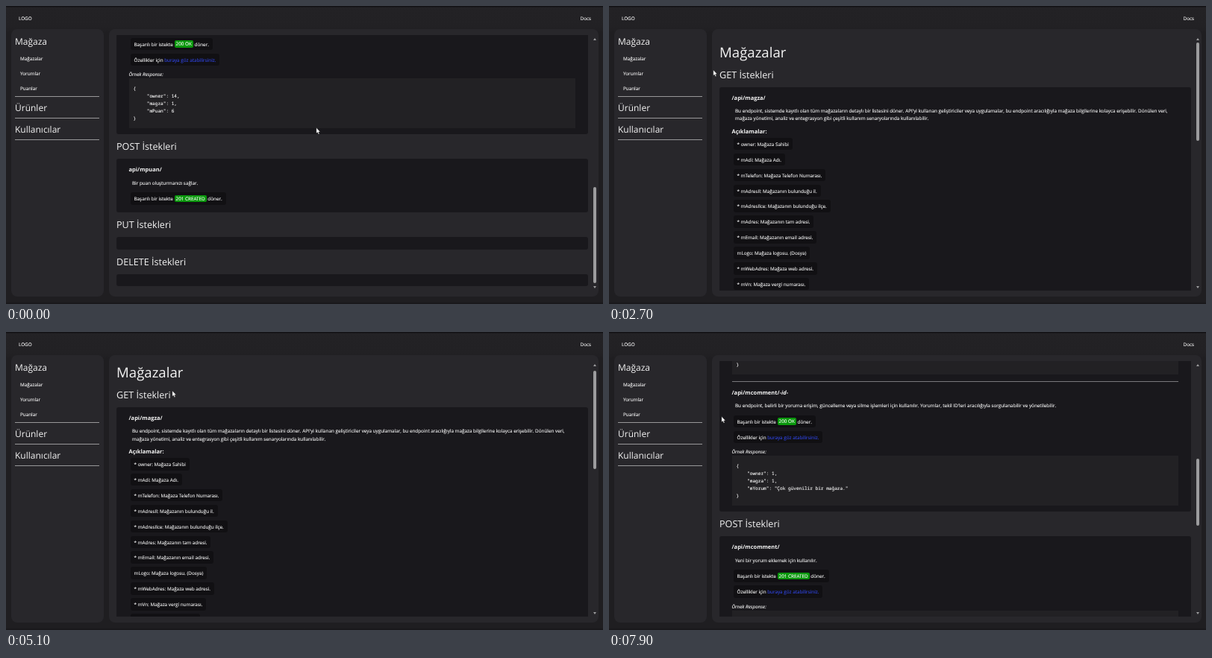
An HTML page for the animation above (8 s loop, 800 px wide and 400 px high).

```html
<!DOCTYPE html>
<html lang="tr">
<head>
<meta charset="utf-8">
<title>API Docs</title>
<style>
html, body { margin: 0; width: 100%; height: 100%; overflow: hidden; background: #1f1e21; }
#stage {
  position: relative; width: 800px; height: 400px; overflow: hidden;
  background: linear-gradient(#121114 1px, #232225 2px, #222124 28px, #1f1e21 36px, #1f1e21 397px, #19181b 399px);
  color: #f4f4f4; font: 6.33px/10.2px "Open Sans", sans-serif; -webkit-text-stroke: .12px;
  text-rendering: geometricPrecision; white-space: nowrap;
}
#stage > * { position: absolute; }
.panel { top: 31px; height: 359px; border-radius: 8px; background: #28272b; }
h1, h2, h3 { margin: 0; font-family: "Open Sans", sans-serif; font-weight: 400; -webkit-text-stroke: 0; }
.side { left: 12px; top: 34px; width: 113px; }
.side h3 { height: 28px; font-size: 12px; line-height: 29.4px; }
.side h3, .menu { border-bottom: 1px solid #989899; }
.side .menu h3 { height: 26px; line-height: 28px; border: 0; }
.menu { height: 87px; }
.side p { margin: 0 7px; height: 20px; line-height: 21px; }
#view { left: 148px; top: 39px; width: 631.5px; height: 343px; overflow: hidden; }
.page { position: absolute; width: 100%; padding-bottom: 6px; }
h1 { height: 36.5px; font-size: 18.6px; line-height: 47.2px; }
h2 { height: 33px; font-size: 12.6px; line-height: 34.9px; }
.box { padding: 8.25px 16.5px; border-radius: 3px; background: #19181c; }
.title { height: 14px; font-weight: 700; font-size: 7.5px; line-height: 15px; -webkit-text-stroke: 0; }
.title.sub { height: 13px; line-height: 14px; }
.desc { padding: 5.5px 4.5px 5.05px; }
.slot { height: 20.9px; }
.chip {
  display: inline-block; margin: 2.2px 0 0 2px; padding: 0 5px; height: 16.5px; line-height: 17.6px;
  border-radius: 3px; background: #111013; vertical-align: top;
}
.ok { padding: .3px 2px; border-radius: 2px; background: #0a970c; color: #fff; }
.link { color: #3044dc; }
.label { box-sizing: border-box; height: 14.9px; padding-top: 5px; font-style: italic; }
pre { margin: 0; padding: 9px 6px 7.5px; background: #222124; font: 6.1px/10px "Noto Sans Mono", monospace; }
.rule { height: 1px; margin: 9px 0 8px; background: #78787b; }
#thumb { left: 787px; width: 4px; border-radius: 2px; background: #9c9c9e; }
.arrow { left: 786.5px; border: solid transparent; border-width: 0 2.5px; }
</style>
</head>
<body>
<div id="stage">
  <div style="left:17px;top:11.6px">LOGO</div>
  <div style="right:16px;top:11.6px">Docs</div>
  <div class="panel" style="left:7px;width:124px"></div>
  <div class="panel" style="left:138px;width:656px"></div>
  <div class="side">
    <div class="menu"><h3>Mağaza</h3><p>Mağazalar</p><p>Yorumlar</p><p>Puanlar</p></div>
    <h3>Ürünler</h3><h3>Kullanıcılar</h3>
  </div>
  <div id="view"></div>
  <div class="arrow" style="top:42.5px;border-bottom:3px solid #9c9c9e"></div>
  <div class="arrow" style="top:376px;border-top:3px solid #9c9c9e"></div>
  <div id="thumb"></div>
  <svg id="cursor" width="8" height="11" style="left:0;top:0">
    <path d="M.3.3V8L2 6.5 3.2 9.2 4.5 8.6 3.3 6H5.6Z" fill="#fff" stroke="#111" stroke-width=".4"/>
  </svg>
</div>
<script>
// [text] becomes a status badge, {text} a link
const rich = s => s.replace(/\[(.+?)\]/g, '<span class="ok">$1</span>')
  .replace(/\{(.+?)\}/g, '<span class="link">$1</span>');
const h1 = s => `<h1>${s}</h1>`;
const section = (name, ...items) => `<h2>${name}</h2><div class="box">${items.join('')}</div>`;
const title = s => `<div class="title">${s.replace('-id-', '<i>-id-</i>')}</div>`;
const sub = s => `<div class="title sub">${s}</div>`;
const desc = (...lines) => `<div class="desc">${lines.join('<br>')}</div>`;
const chips = (...list) => list.map(s => `<div class="slot"><span class="chip">${rich(s)}</span></div>`).join('');
const rule = '<div class="rule"></div>';
const sample = (...lines) => `<div class="label">Örnek Response:</div><pre>${lines.join('\n')}</pre>`;
const record = (outer, inner, fields) => [
  ' '.repeat(outer) + '{',
  ...fields.map(([key, value], i) => `${' '.repeat(inner)}"${key}": ${value}${i < fields.length - 1 ? ',' : ''}`),
  ' '.repeat(outer) + '}'];
const list = (outer, inner, rows, close) => [
  '[', ...rows.flatMap((row, i) => {
    const lines = record(outer, inner, row);
    if (i < rows.length - 1) lines[lines.length - 1] += ',';
    return lines;
  }), close];

const ok = 'Başarılı bir istekte [200 OK] döner.';
const created = 'Başarılı bir istekte [201 CREATED] döner.';
const see = 'Özellikler için {buraya göz atabilirsiniz.}';
const score = (owner, shop, value) => [['owner', owner], ['magza', shop], ['mPuan', value]];
const comment = owner => [['owner', owner], ['magza', 1], ['mYorum', '"Çok güvenilir bir mağaza."']];
const oneComment = sample(...record(0, 4, comment(1)));

const scores = h1('Puanlar') +
  section('Özellikler', chips('* owner: Puanlama yapan üye.', '* magza: Puanlama yapılan {Mağaza}.',
    '* mPuan: Üyenin puanı (10 üzerinden).')) +
  section('GET İstekleri',
    title('api/mpuan/'), desc('Bütün puanlamaları getirir.'), chips(ok, see),
    sample(...list(3, 5, [score(1, 1, 9), score(2, 1, 8), score(14, 1, 6)], ']')), rule,
    title('api/mpuan/-id-'), desc('Belirli bir puanlamayı getirir.'), chips(ok, see),
    sample(...record(0, 5, score(14, 1, 6)))) +
  section('POST İstekleri', title('api/mpuan/'), desc('Bir puan oluşturmanızı sağlar.'), chips(created)) +
  section('PUT İstekleri') + section('DELETE İstekleri');

const shops = h1('Mağazalar') +
  section('GET İstekleri',
    title('/api/magza/'),
    desc("Bu endpoint, sistemde kayıtlı olan tüm mağazaların detaylı bir listesini döner. API'yi kullanan geliştiriciler veya uygulamalar, bu endpoint aracılığıyla mağaza bilgilerine kolayca erişebilir. Dönülen veri,",
      'mağaza yönetimi, analiz ve entegrasyon gibi çeşitli kullanım senaryolarında kullanılabilir.'),
    sub('Açıklamalar:'),
    chips('* owner: Mağaza Sahibi', '* mAdi: Mağaza Adı.', '* mTelefon: Mağaza Telefon Numarası.',
      '* mAdresIl: Mağazanın bulunduğu il.', '* mAdresIlce: Mağazanın bulunduğu ilçe.',
      '* mAdres: Mağazanın tam adresi.', '* mEmail: Mağazanın email adresi.', 'mLogo: Mağaza logosu. (Dosya)',
      '* mWebAdres: Mağaza web adresi.', '* mVn: Mağaza vergi numarası.', '* mVd: Mağaza vergi dairesi.',
      'mBakiye: Mağaza güncel bakiyesi.'),
    rule, title('/api/magza/-id-'),
    desc("Bu endpoint, belirli bir mağazanın detaylarını almak için kullanılır. -id- kısmı, istenen mağazanın benzersiz kimliğini (ID) temsil eder. Endpoint'e yapılan GET isteği, mağazaya ait temel bilgileri ve ilişkili",
      'diğer verileri JSON formatında döndürür.')) +
  section('POST İstekleri', title('/api/magza/'),
    desc('Bu endpoint, yeni bir mağaza oluşturmak için kullanılır. Sisteme mağaza bilgileri göndererek bir mağaza kaydı eklemenizi sağlar.'),
    chips('Başarılı bir sonuçta [201 Created] döner.', 'Gerekli alanlar için {buraya göz atabilirsiniz.}')) +
  section('PUT İstekleri', title('/api/magza/-id-'), desc('Belirli bir mağazayı güncellemenizi sağlar.'),
    chips(ok, 'Güncellemek istediğiniz özellikleri {buradan görebilirsiniz}')) +
  section('DELETE İstekleri', title('/api/magza/-id-'), desc('Belirli bir mağazayı silmenizi sağlar.'),
    chips('Başarılı bir istekte [410 Gone] döner.', 'Herhangi bir özelliğe ihtiyacınız yok.'));

const comments = h1('Yorumlar') +
  section('Özellikler', chips('* owner: Yorumu yazan üye.', '* magza: Yorum yapılan {Mağaza}.',
    '* mYorum: Üyenin yorumu.')) +
  section('GET İstekleri', title('/api/mcomment/'),
    desc('Bu endpoint, mağazalar için yapılan yorumların yönetimi ve görüntülenmesi amacıyla tasarlanmıştır. Kullanıcılar, belirli bir mağazaya ait yorumları oluşturabilir, listeleyebilir veya güncelleyebilir. Sistem,',
      'kullanıcıların mağaza deneyimlerini paylaşmasını ve bu yorumların yönetilmesini sağlar.'),
    chips(ok, see), sample(...list(2, 4, [comment(1), comment(2), comment(3)], '}')), rule,
    title('/api/mcomment/-id-'),
    desc("Bu endpoint, belirli bir yoruma erişim, güncelleme veya silme işlemleri için kullanılır. Yorumlar, tekil ID'leri aracılığıyla sorgulanabilir ve yönetilebilir."),
    chips(ok, see), oneComment) +
  section('POST İstekleri', title('/api/mcomment/'), desc('Yeni bir yorum eklemek için kullanılır.'),
    chips(created, see), oneComment) +
  section('PUT İstekleri', title('/api/mcomment/-id-'),
    desc('Belirli bir yorumu güncellemenizi sağlar.', 'Yalnızca yorum sahibi kullanabilir.'),
    chips(ok, see), oneComment) +
  section('DELETE İstekleri', title('/api/mcomment/-id-'),
    desc('Belirli bir yorumu silmenizi sağlar.', 'Yalnızca yorum sahibi kullanabilir.'),
    chips('Başarılı bir istekte [410 Gone] döner.', 'Herhangi bir özelliğe ihtiyacınız yok.'));

const $ = id => document.getElementById(id);
$('view').innerHTML = [scores, shops, comments].map(html => `<div class="page">${html}</div>`).join('');
const pages = [...document.querySelectorAll('.page')];

const LOOP = 8000, STEP = 100, VIEW = 343, TRACK = 323, TRACK_TOP = 49;
const pageStarts = [0, 2500, 6100];
// time, scrolled share of the page
const scrollKeys = [[100, 1], [1700, 0], [2499, 0], [2780, 0], [3590, 1], [4700, 1], [5132, 0], [7200, 0], [8565, 1]];
// time, x, y of the pointer tip
const cursorKeys = [[0, 415.5, 163], [1800, 397.5, 155], [1950, 397.5, 155], [2300, 36, 68], [2500, 36, 68],
  [2950, 284, 110], [4200, 284, 110], [4500, 307, 219], [4700, 307, 219], [5100, 222.5, 78.5],
  [5200, 222.5, 78.5], [5800, 33, 89], [6150, 33, 89], [6700, 149.5, 113.5], [7900, 150.5, 113]];

function at(keys, t) {
  const next = keys.findIndex(key => key[0] > t);
  if (next < 1) return keys[next ? keys.length - 1 : 0].slice(1);
  const a = keys[next - 1], b = keys[next];
  const u = (t - a[0]) / (b[0] - a[0]), ease = u * u * (3 - 2 * u);
  return a.slice(1).map((v, i) => v + (b[i + 1] - v) * ease);
}

function draw(now) {
  const t = Math.floor(now % LOOP / STEP) * STEP;
  const current = pageStarts.filter(start => start <= t).length - 1;
  pages.forEach((page, i) => page.style.visibility = i === current ? 'visible' : 'hidden');

  const height = pages[current].getBoundingClientRect().height;
  const [share] = at(scrollKeys, t), [x, y] = at(cursorKeys, t);
  const thumb = TRACK * VIEW / height;
  pages[current].style.top = -share * (height - VIEW) + 'px';
  $('thumb').style.height = thumb + 'px';
  $('thumb').style.top = TRACK_TOP + share * (TRACK - thumb) + 'px';
  $('cursor').style.transform = `translate(${x}px, ${y}px)`;
  requestAnimationFrame(draw);
}
requestAnimationFrame(draw);
</script>
</body>
</html>
```
